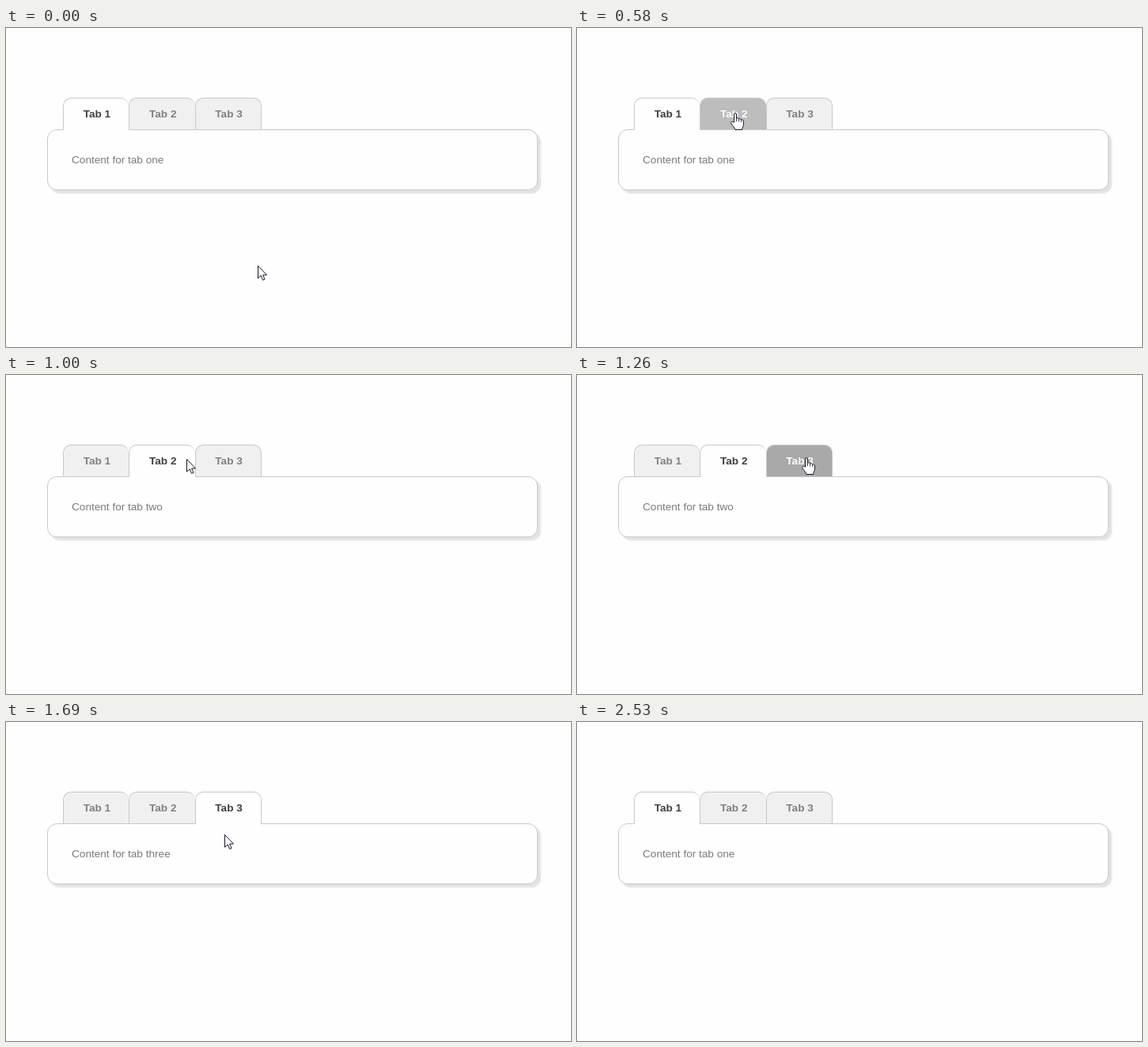
Write an HTML page that moves like this. It is 714 px wide and 403 px high and loops after 2.78 s.

```html
<!DOCTYPE html>
<html lang="en">
<head>
<meta charset="utf-8">
<title>Tabs</title>
<style>
  html, body { margin: 0; width: 100%; height: 100%; overflow: hidden; background: #fefefe; }
  div, svg { position: absolute; box-sizing: border-box; }
  .panel {
    left: 52px; top: 128px; width: 620px; height: 77px;
    background: #fefefe; border: 1px solid #c8c8c8; border-radius: 12px;
    box-shadow: 4px 4px 2px #e2e2e2;
  }
  .tab {
    top: 88px; height: 40px;
    border: solid #c8c8c8; border-width: 1px 0 0 1px;
    border-radius: 10px 10px 0 0;
  }
  .tab.last { border-right-width: 1px; }
  .tab.active { height: 41px; }
  svg { left: 0; top: 0; }
  text { font: 13.6px "Liberation Sans", Arial, sans-serif; fill: #7b7b7b; }
  .label { font-weight: bold; }
  .cursor { fill: #fff; stroke: #15152a; stroke-linejoin: round; }
</style>
</head>
<body>
<div class="panel"></div>
<div class="tab" style="left:72px;width:83px"></div>
<div class="tab" style="left:155px;width:84px"></div>
<div class="tab last" style="left:239px;width:84px"></div>
<svg width="714" height="403">
  <text class="label" x="97.7" y="113">Tab 1</text>
  <text class="label" x="181" y="113">Tab 2</text>
  <text class="label" x="264.3" y="113">Tab 3</text>
  <text id="content" x="83" y="171"></text>
  <g class="cursor" id="arrow">
    <path d="M.5 .5V16.2L4.2 12.8 6.6 18.4 9 17.4 6.6 12H11.5Z"/>
  </g>
  <g class="cursor" id="hand">
    <path d="M4.5 12V2C4.5 .1 7.5 .1 7.5 2V7C9 6.3 10.3 6.8 10.5 8 12 7.3 13.2 7.8 13.4 9 15 8.4 16.4 9.3 16.4 11V15C16.4 17 14.8 18.5 14.5 21.5H6C5.5 19 2.5 16.5 .8 13.5 0 11.6 2.4 10.3 4.5 12.6"/>
    <path d="M7.5 7V11M10.5 8V11.5M13.4 9V12" fill="none" stroke-width=".8"/>
  </g>
</svg>
<script>
const LOOP = 2780;
const IDLE = 240, HOVER = 169, PAGE = 254;
const words = ["one", "two", "three"];

// start: ms, active: open tab, hot: tab in transition, fill: its grey level
const steps = [
  { start: 0, active: 0, cursor: "arrow", x: 318, y: 300 },
  { start: 150, active: 0, cursor: "arrow", x: 315, y: 295 },
  { start: 310, active: 0, hot: 1, fill: 238, cursor: "hand", x: 226, y: 86 },
  { start: 460, active: 0, hot: 1, fill: 217, cursor: "hand", x: 199, y: 103 },
  { start: 580, active: 0, hot: 1, fill: 189, cursor: "hand", x: 194, y: 107 },
  { start: 730, active: 0, hot: 1, fill: HOVER, cursor: "hand", x: 194, y: 106 },
  { start: 850, active: 1, hot: 1, fill: 237, cursor: "arrow", x: 200, y: 105 },
  { start: 1000, active: 1, cursor: "arrow", x: 228, y: 106 },
  { start: 1140, active: 1, hot: 2, fill: 205, cursor: "hand", x: 276, y: 104 },
  { start: 1260, active: 1, hot: 2, fill: HOVER, cursor: "hand", x: 284, y: 104 },
  { start: 1540, active: 2, hot: 2, fill: 237, cursor: "arrow", x: 289, y: 106 },
  { start: 1690, active: 2, cursor: "arrow", x: 276, y: 142 },
  { start: 1840, active: 2, hot: 0, fill: 215, cursor: "hand", x: 125, y: 119 },
  { start: 1970, active: 2, hot: 0, fill: 174, cursor: "hand", x: 107, y: 117 },
  { start: 2270, active: 0, hot: 0, fill: 237, cursor: "arrow", x: 112, y: 117 },
  { start: 2400, active: 0, cursor: "arrow", x: 590, y: 386 },
  { start: 2530, active: 0 }
];

const tabs = document.querySelectorAll(".tab");
const labels = document.querySelectorAll(".label");
const cursors = document.querySelectorAll(".cursor");
const content = document.getElementById("content");
const grey = v => `rgb(${v},${v},${v})`;
let shown;

function labelGrey(active, fill) {
  if (active) return 64;
  const amount = (IDLE - fill) / (IDLE - HOVER);
  return Math.min(255, Math.round(128 + 170 * amount));
}

function show(step) {
  tabs.forEach((tab, i) => {
    const active = i === step.active;
    const fill = i === step.hot ? step.fill : active ? PAGE : IDLE;
    tab.classList.toggle("active", active);
    tab.style.backgroundColor = grey(fill);
    labels[i].style.fill = grey(labelGrey(active, fill));
  });
  content.textContent = "Content for tab " + words[step.active];
  cursors.forEach(cursor => {
    const visible = cursor.id === step.cursor;
    cursor.style.display = visible ? "" : "none";
    if (visible) cursor.setAttribute("transform", `translate(${step.x} ${step.y})`);
  });
}

function tick() {
  const time = performance.now() % LOOP;
  const step = steps.findLast(s => s.start <= time);
  if (step !== shown) show(shown = step);
  requestAnimationFrame(tick);
}
tick();
</script>
</body>
</html>
```
